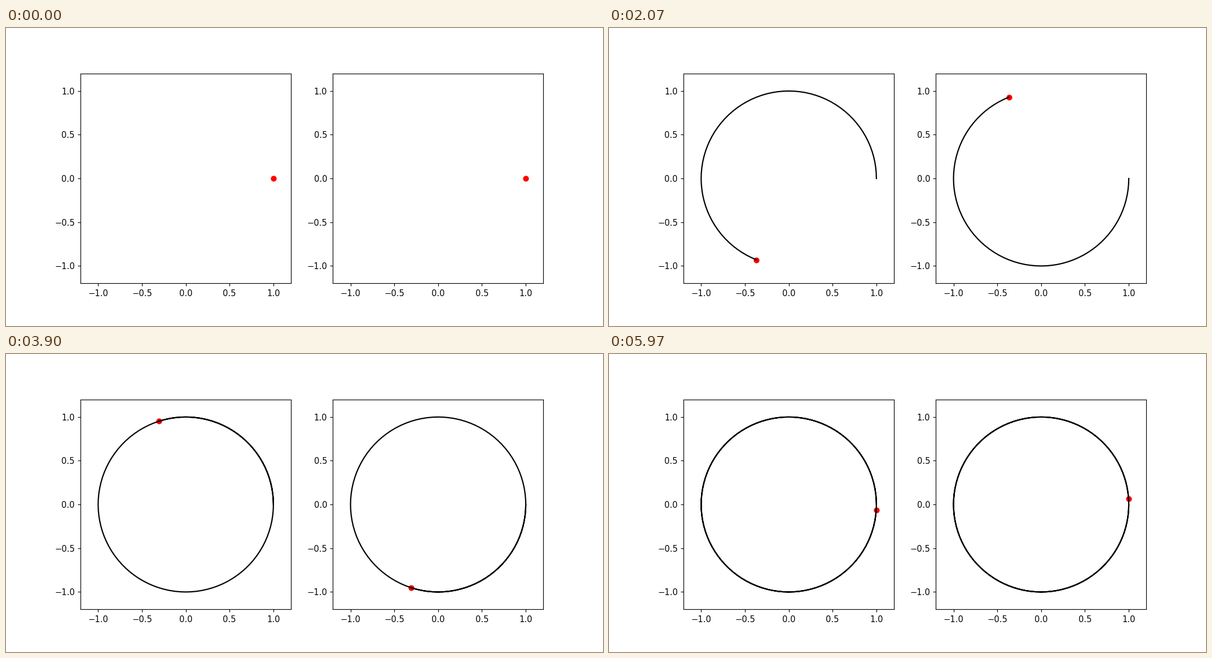
A matplotlib script for the animation above (6 s loop, 1058 px wide and 529 px high).

```python
import numpy as np
import matplotlib.pyplot as plt
from matplotlib.animation import FuncAnimation

plt.rcParams["font.family"] = "DejaVu Sans"

FRAMES = 200
STEPS_PER_TURN = 100
INTERVAL = 30

angle = 2 * np.pi * np.arange(FRAMES) / STEPS_PER_TURN
x, y = np.cos(angle), np.sin(angle)

fig, axes = plt.subplots(1, 2, figsize=(10, 5), dpi=105.8)


def make_panel(ax, direction):
    """Set up one square panel; direction is +1 (counterclockwise) or -1."""
    ax.set_aspect("equal")
    ax.set_xlim(-1.2, 1.2)
    ax.set_ylim(-1.2, 1.2)
    ticks = np.arange(-1, 1.1, 0.5)
    ax.set_xticks(ticks)
    ax.set_yticks(ticks)
    dot, = ax.plot([], [], "o", color="red")
    trail, = ax.plot([], [], color="black", lw=1.5)
    return dot, trail, direction * y


panels = [make_panel(ax, d) for ax, d in zip(axes, (1, -1))]


def update(n):
    artists = []
    for dot, trail, py in panels:
        dot.set_data([x[n]], [py[n]])
        trail.set_data(x[:n + 1], py[:n + 1])
        artists += [dot, trail]
    return artists


anim = FuncAnimation(fig, update, frames=FRAMES, init_func=lambda: update(0),
                     interval=INTERVAL, repeat=True, repeat_delay=0)
plt.show()
```
